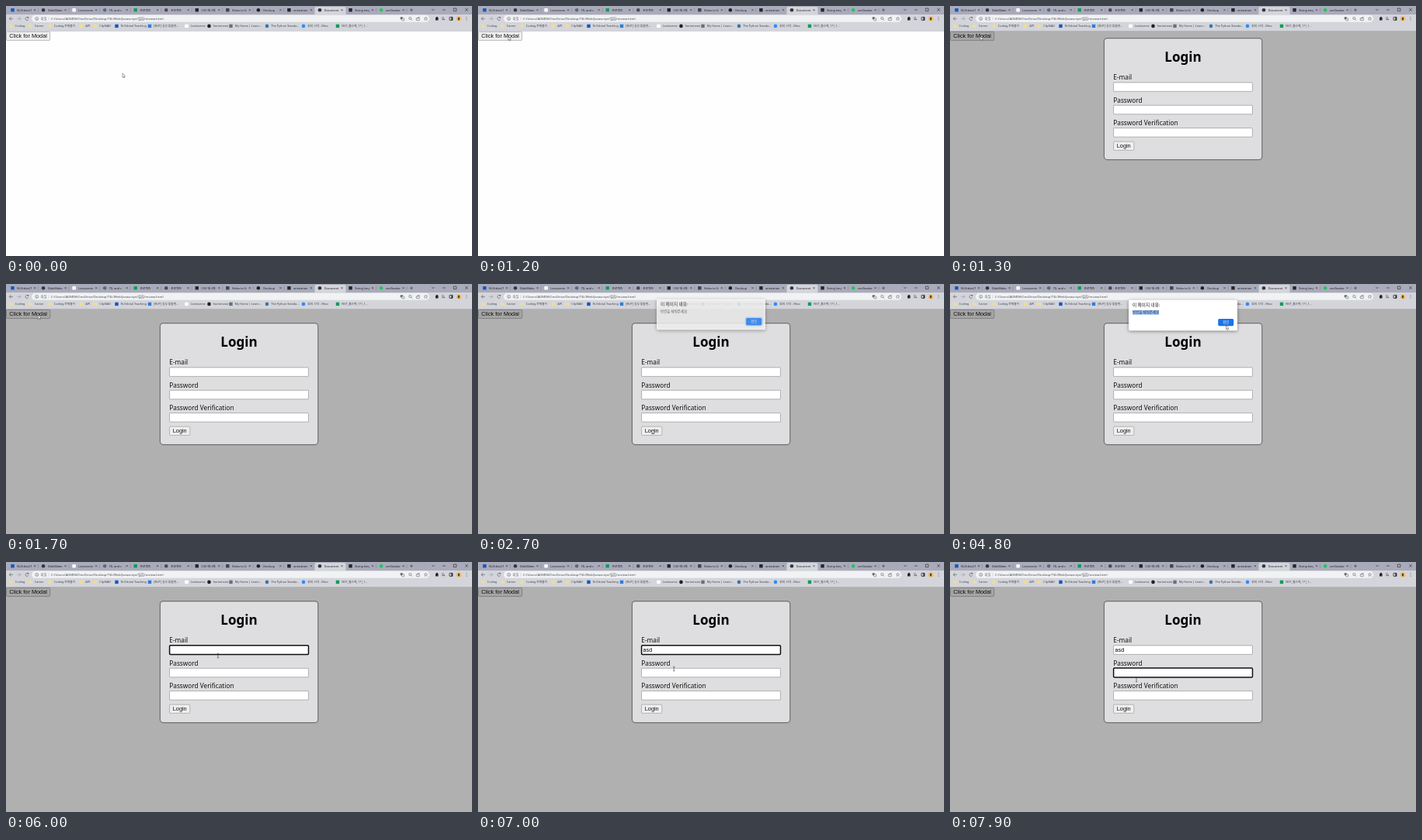
Write an HTML page with a canvas that moves like this. It is 600 px wide and 323 px high and loops after 8 s.

```html
<!DOCTYPE html>
<html lang="ko">
<head>
<meta charset="utf-8">
<title>Login modal</title>
<style>
  html, body { margin: 0; width: 100%; height: 100%; overflow: hidden; background: #fff; }
  canvas { display: block; width: 600px; height: 323px; }
</style>
</head>
<body>
<canvas id="stage"></canvas>
<script>
const LOOP = 8000, STEP = 100;
const UI = '"Noto Sans", "Noto Sans CJK KR", sans-serif';
const FORM = '"Liberation Sans", sans-serif';
const BAR = '#d4d5db';
const canvas = document.getElementById('stage');
const ctx = canvas.getContext('2d');
const ratio = window.devicePixelRatio || 1;
canvas.width = 600 * ratio;
canvas.height = 323 * ratio;

const TABS = [
  ['N-Orbital T', '#1557c0'], ['SlideMaker', '#33363d', 'o'], ['Lectoverse', '#fff'],
  ['TIL and c', '#5b6b80', 'o'], ['프로젝트', '#0f9d58'], ['프로젝트', '#4b4b52', 'o'],
  ['CSS 애니메', '#25262b'], ['Video to G', '#3e4452'], ['Checkup', '#202124', 'o'],
  ['animation', '#25262b'], ['Document', '#33363d', 'o'], ['String leng', '#25262b'],
  ['verification', '#22c55e', 'o'],
];
const ACTIVE = 10;

// x of icon centre, label, colour, shape
const BOOKMARKS = [
  [6.5, 'Coding', '#f6dc8c', 'f'], [31.5, 'Career', '#f6dc8c', 'f'],
  [56.5, 'Coding 문제풀이', '#f6dc8c', 'f'], [97, 'API', '#f6dc8c', 'f'],
  [115, 'ClipNAD', '#f6dc8c', 'f'], [142.5, 'N-Orbital Teaching', '#1557c0'],
  [185, '[NVT] 실무 맞춤형...', '#2f7de1'], [232.5, 'Lectoverse', '#fff'],
  [261.5, 'harimnoon', '#202124', 'o'], [289.5, 'My Home | Learn...', '#6a6f7c'],
  [336, 'The Python Standa...', '#3b76a8', 'o'], [383, '회의 시작 - Mivo', '#2d8cff', 'o'],
  [427, 'NVT_풀스택_1기_1...', '#0f9d58'],
];

// time, x, y of the pointer's hot spot
const POINTER = [
  [0, 150, 87], [200, 148, 86], [900, 39, 39], [1600, 39, 39], [2000, 54, 46],
  [2500, 224, 188], [2900, 224, 188], [3700, 270, 38], [4000, 269, 37],
  [4400, 235, 37], [4750, 355.5, 53.5], [5000, 355.5, 53.5], [5400, 268, 186],
  [5700, 272, 123], [5900, 273, 121], [6600, 273, 121], [7200, 245, 144],
  [7700, 240, 150], [7900, 240, 152],
];

const clamp = v => Math.max(0, Math.min(1, v));

function pointerAt(t) {
  const i = POINTER.findIndex(p => p[0] > t);
  if (i < 0) return POINTER[POINTER.length - 1].slice(1);
  const [t0, x0, y0] = POINTER[i - 1], [t1, x1, y1] = POINTER[i];
  const k = (t - t0) / (t1 - t0), e = k * k * (3 - 2 * k);
  return [x0 + (x1 - x0) * e, y0 + (y1 - y0) * e];
}

function rect(x, y, w, h, fill) {
  ctx.fillStyle = fill;
  ctx.fillRect(x, y, w, h);
}

function box(x, y, w, h, r, fill, stroke, width = 0.6) {
  ctx.beginPath();
  ctx.roundRect(x, y, w, h, r);
  if (fill) { ctx.fillStyle = fill; ctx.fill(); }
  if (stroke) { ctx.strokeStyle = stroke; ctx.lineWidth = width; ctx.stroke(); }
}

function disc(x, y, r, fill, stroke) {
  box(x - r, y - r, 2 * r, 2 * r, r, fill, stroke);
}

function line(color, width, ...points) {
  ctx.beginPath();
  points.forEach(([x, y]) => ctx.lineTo(x, y));
  ctx.strokeStyle = color;
  ctx.lineWidth = width;
  ctx.stroke();
}

function text(str, x, y, size, color, family = UI, align = 'left', weight = 400) {
  ctx.font = `${weight} ${size}px ${family}`;
  ctx.textAlign = align;
  ctx.fillStyle = color;
  ctx.fillText(str, x, y);
}

function icon(x, y, color, shape) {
  if (shape === 'o') disc(x, y, 2.3, color);
  else if (shape === 'f') {
    rect(x - 2, y - 2, 2, 1, color);
    rect(x - 2, y - 1.5, 4.2, 3.4, color);
  } else rect(x - 2.2, y - 2.2, 4.4, 4.4, color);
}

function cross(x, y, r, color) {
  line(color, 0.6, [x - r, y - r], [x + r, y + r]);
  line(color, 0.6, [x + r, y - r], [x - r, y + r]);
}

function tabStrip() {
  rect(0, 0, 600, 11, '#a9abba');
  box(397.5, 1, 40, 12, 2, BAR);
  TABS.forEach(([label, color, shape], i) => {
    const x = 39.55 * i;
    icon(8.5 + x, 5.2, color, shape);
    ctx.save();
    ctx.beginPath();
    ctx.rect(14 + x, 0, 19, 11);
    ctx.clip();
    text(label, 14.2 + x, 6.6, 3.8, '#202124');
    ctx.restore();
    cross(37 + x, 5.2, 1.1, '#333');
    if (i !== ACTIVE && i !== ACTIVE - 1) line('#74778a', 0.4, [41.5 + x, 3], [41.5 + x, 8]);
  });
  line('#333', 0.6, [520, 5.2], [524, 5.2]);
  line('#333', 0.6, [522, 3.2], [522, 7.2]);
  line('#222', 0.6, [548.3, 4], [550, 5.7], [551.7, 4]);
  line('#222', 0.6, [562, 5], [566, 5]);
  box(576.3, 3, 3.6, 3.6, 0, null, '#222');
  cross(593, 4.8, 1.8, '#222');
}

function toolbar() {
  rect(0, 11, 600, 21.5, BAR);
  box(33, 11.8, 512, 9, 4.5, '#f1f2f4');
  const ink = '#5f6368';
  line(ink, 0.7, [6.5, 14.2], [4.3, 16.4], [6.5, 18.6]);
  line(ink, 0.7, [4.3, 16.4], [9, 16.4]);
  line('#9b9ea5', 0.7, [16.8, 14.2], [19, 16.4], [16.8, 18.6]);
  line('#9b9ea5', 0.7, [14.3, 16.4], [19, 16.4]);
  ctx.beginPath();
  ctx.arc(27, 16.4, 2, 0.4, 5.6);
  ctx.strokeStyle = ink;
  ctx.stroke();
  rect(27.6, 14, 1.6, 1.6, ink);
  disc(39.7, 16.4, 2, null, ink);
  line(ink, 0.6, [39.7, 16], [39.7, 17.6]);
  text('파일', 44.8, 17.9, 4.2, ink);
  line('#bbb', 0.5, [55, 14.4], [55, 18.4]);
  text('C:/Users/ADMIN/OneDrive/Desktop/TIL/Web/Javascript/실습/review.html', 58, 17.9, 4.27, '#4a4c50');

  box(507.8, 14.2, 3, 3, 0.5, ink);
  box(509.8, 15.8, 3, 3, 0.5, '#f1f2f4', ink);
  disc(520.3, 15.9, 1.6, null, ink);
  line(ink, 0.7, [521.5, 17.1], [523, 18.6]);
  box(528.3, 15.6, 4, 3, 0.4, null, ink);
  line(ink, 0.6, [529.8, 16.7], [530.8, 14.5], [532.7, 14.5]);
  ctx.beginPath();
  for (let i = 0; i < 10; i++) {
    const a = i * Math.PI / 5 - Math.PI / 2, r = i % 2 ? 1.1 : 2.4;
    ctx.lineTo(540.5 + r * Math.cos(a), 16.4 + r * Math.sin(a));
  }
  ctx.closePath();
  ctx.strokeStyle = ink;
  ctx.lineWidth = 0.5;
  ctx.stroke();
  box(553, 14.8, 3.6, 3.6, 0.6, '#25272a');
  disc(555, 14.6, 0.9, '#25272a');
  [14.8, 16.2, 17.6].forEach(y => line(ink, 0.6, [561, y], [564, y]));
  disc(564.2, 17.4, 0.8, ink);
  box(571, 14.4, 4, 4, 0.4, null, '#25272a', 0.8);
  rect(573.4, 14.4, 1.6, 4, '#25272a');
  disc(583, 16.4, 3, '#f2b544');
  rect(582, 14.8, 2, 3.4, '#5b4024');
  [14.6, 16.4, 18.2].forEach(y => disc(593, y, 0.5, ink));

  BOOKMARKS.forEach(([x, label, color, shape]) => {
    icon(x, 25.9, color, shape);
    text(label, x + 5.3, 27.4, 3.75, '#43464b');
  });
  line('#b9bac0', 0.5, [0, 32.4], [600, 32.4]);
}

function button(label, x, y, w, h) {
  box(x, y, w, h, 1, '#efefef', '#808080', 0.5);
  text(label, x + w / 2, y + h / 2 + 2.5, 7.35, '#111', FORM, 'center');
}

function field(label, y, value, focused) {
  text(label, 210.3, y - 3.6, 8.25, '#111');
  if (focused) box(210.6, y, 178.9, 11.8, 1.2, '#fff', '#101010', 1.5);
  else box(210.6, y + 0.2, 178.8, 11.5, 0.6, '#fff', '#858585');
  text(value, 212.6, y + 8.2, 7.2, '#000', FORM);
}

function modal(t) {
  rect(0, 32.5, 600, 291, 'rgba(0,0,0,.31)');
  ctx.save();
  ctx.translate(0, t < 1400 ? -9 : 0);
  box(198.4, 50.6, 203.4, 157, 4, '#dedddf', '#707070', 1.2);
  text('Login', 300, 81.4, 17.1, '#000', UI, 'center', 700);
  const typed = 'asd'.slice(0, Math.max(0, Math.floor((t - 6100) / 150)));
  field('E-mail', 107.7, typed, t >= 5800 && t < 7200);
  field('Password', 137.1, '', t >= 7200);
  field('Password Verification', 166.5, '', false);
  button('Login', 210.6, 184.2, 26.2, 11.2);
  ctx.restore();
}

function alertBox(t, pointerX) {
  const shown = clamp((t - 2620) / 100);
  ctx.save();
  ctx.globalAlpha = shown;
  ctx.translate(0, shown < 1 ? -1 : 0);
  ctx.shadowColor = 'rgba(0,0,0,.4)';
  ctx.shadowBlur = 4 * ratio;
  ctx.shadowOffsetY = ratio;
  box(230, 20.4, 140, 39.8, 1.6, '#fff');
  ctx.shadowColor = 'transparent';
  text('이 페이지 내용:', 235, 29.2, 5.6, '#202124');
  if (t > 4000) {
    const from = t < 4400 ? Math.max(235, pointerX) : 235;
    rect(from, 33.8, 269 - from, 5.8, '#8fb8ee');
  }
  text('빈칸을 채워주세요', 235, 38.4, 4.5, '#3c4043');
  if (t < 4000) box(344.6, 44.4, 21.2, 10.2, 2, null, '#a9c9f8', 1.6);
  box(345.2, 45, 20, 9.2, 1.6, '#1a73e8');
  text('확인', 355.2, 51.2, 4.3, '#fff', UI, 'center');
  ctx.restore();
}

function pointer(x, y, beam) {
  if (beam) {
    line('#333', 0.6, [x, y - 2.6], [x, y + 2.6]);
    line('#333', 0.6, [x - 1.1, y - 2.7], [x + 1.1, y - 2.7]);
    line('#333', 0.6, [x - 1.1, y + 2.7], [x + 1.1, y + 2.7]);
    return;
  }
  ctx.beginPath();
  [[0, 0], [0, 5.2], [1.2, 4.2], [2, 6], [2.8, 5.6], [2, 3.9], [3.6, 3.8]]
    .forEach(([dx, dy]) => ctx.lineTo(x + dx, y + dy));
  ctx.closePath();
  ctx.fillStyle = '#fff';
  ctx.fill();
  ctx.strokeStyle = '#444';
  ctx.lineWidth = 0.5;
  ctx.stroke();
}

function draw(now) {
  const t = Math.floor(now % LOOP / STEP) * STEP;
  const [x, y] = pointerAt(t);
  ctx.setTransform(ratio, 0, 0, ratio, 0, 0);
  rect(0, 0, 600, 323, '#fefefe');
  tabStrip();
  toolbar();
  button('Click for Modal', 0.5, 33.4, 56.2, 11);
  if (t >= 1300) modal(t);
  if (t >= 2700 && t < 5000) alertBox(t, x);
  pointer(x, y, t >= 5600 || (t >= 3800 && t < 4500));
  requestAnimationFrame(draw);
}
requestAnimationFrame(draw);
</script>
</body>
</html>
```
